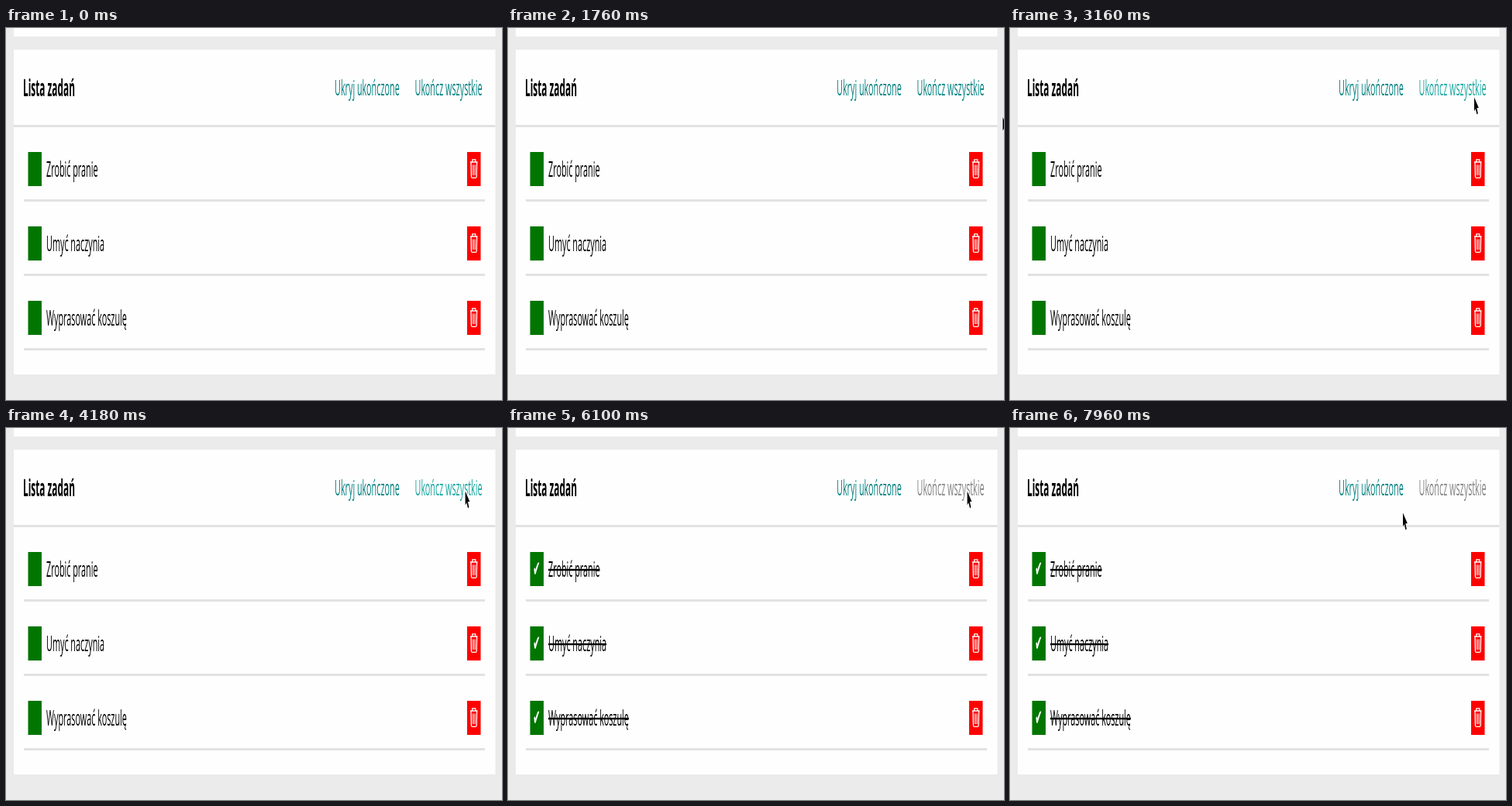
An HTML page with a canvas for the animation above (8000 ms loop, 640x480 px).

```html
<!DOCTYPE html>
<html lang="pl">
<head>
<meta charset="utf-8">
<title>Lista zadań</title>
<style>
  html, body { margin: 0; width: 100%; height: 100%; overflow: hidden; background: #ebebeb; }
  canvas { display: block; width: 640px; height: 480px; }
</style>
</head>
<body>
<canvas id="stage" width="640" height="480"></canvas>
<script>
const ctx = document.getElementById('stage').getContext('2d');

const LOOP = 8000;
const SQUEEZE = 0.395; // the whole page is shown narrowed
const HOVER_AT = 2760;
const CLICK_AT = 4640;
const FADE = 300;

const PAGE = '#ebebeb';
const CARD = '#fefefe';
const RULE = '#e2e2e2';
const LINK = [0, 128, 128];
const LINK_HOVER = [22, 166, 160];
const LINK_OFF = [132, 132, 132];

const tasks = ['Zrobić pranie', 'Umyć naczynia', 'Wyprasować koszulę'];

// time, x, y of the pointer tip
const path = [
  [1560, 643, 118],
  [2320, 616.6, 99.5],
  [2700, 612, 97],
  [3160, 599, 89.5],
  [3600, 592.6, 81.5],
  [7300, 592.6, 81.5],
  [7960, 507, 109.5],
  [8000, 504, 109.5]
];

const clamp = v => Math.min(1, Math.max(0, v));
const ease = v => v * v * (3 - 2 * v);
const mix = (a, b, p) => a + (b - a) * p;
const mixColor = (a, b, p) => a.map((v, i) => Math.round(mix(v, b[i], p)));
const rgb = c => `rgb(${c.join(',')})`;

function rect(color, x, y, w, h) {
  ctx.fillStyle = color;
  ctx.fillRect(x, y, w, h);
}

function text(str, x, y, color, font, struck) {
  ctx.save();
  ctx.translate(x, y);
  ctx.scale(SQUEEZE, 1);
  ctx.font = font;
  ctx.fillStyle = color;
  ctx.fillText(str, 0, 0);
  if (struck) ctx.fillRect(0, -10.2, ctx.measureText(str).width, 2.4);
  ctx.restore();
}

const plain = (str, x, y, color, struck) =>
  text(str, x, y, color, '27.4px "Open Sans", sans-serif', struck);

function trash(x, y) {
  ctx.save();
  ctx.translate(x, y);
  ctx.strokeStyle = '#fff';
  ctx.lineWidth = 1.3;
  ctx.beginPath();
  ctx.moveTo(4, 13);
  ctx.lineTo(13.5, 13);
  ctx.moveTo(6.8, 12.5);
  ctx.lineTo(6.8, 9.8);
  ctx.lineTo(10.8, 9.8);
  ctx.lineTo(10.8, 12.5);
  ctx.moveTo(5, 13);
  ctx.lineTo(5.4, 31.5);
  ctx.quadraticCurveTo(5.5, 33.3, 6.4, 33.3);
  ctx.lineTo(11.2, 33.3);
  ctx.quadraticCurveTo(12.1, 33.3, 12.2, 31.5);
  ctx.lineTo(12.6, 13);
  ctx.stroke();
  ctx.lineWidth = 0.8;
  ctx.beginPath();
  for (const bar of [7.3, 8.8, 10.3]) {
    ctx.moveTo(bar, 16.5);
    ctx.lineTo(bar, 30);
  }
  ctx.stroke();
  ctx.restore();
}

function row(label, i, done) {
  const y = 160 + i * 95.8;
  const top = Math.round(y);
  rect('#007500', 28.5, top, 17.5, 44);
  rect('#ff0000', 595, top, 17.5, 44);
  if (done) text('✔', 32.2, top + 31, '#fff', '28px "DejaVu Sans", sans-serif');
  plain(label, 52, top + 32, '#000', done);
  trash(595, top);
  rect(RULE, 23, Math.round(y + 61), 595, 3);
}

function linkColor(t) {
  if (t >= CLICK_AT) return mixColor(LINK_HOVER, LINK_OFF, clamp((t - CLICK_AT) / FADE));
  return mixColor(LINK, LINK_HOVER, clamp((t - HOVER_AT) / FADE));
}

function pointerAt(t) {
  const i = path.findIndex(p => t < p[0]);
  if (i < 1) return null;
  const [t0, x0, y0] = path[i - 1];
  const [t1, x1, y1] = path[i];
  const p = ease((t - t0) / (t1 - t0));
  return [mix(x0, x1, p), mix(y0, y1, p)];
}

function pointer([x, y]) {
  ctx.save();
  ctx.translate(x, y);
  ctx.beginPath();
  ctx.moveTo(0, 0);
  ctx.lineTo(0, 18);
  ctx.lineTo(1.7, 14.8);
  ctx.lineTo(3.4, 22);
  ctx.lineTo(4.8, 20.8);
  ctx.lineTo(3.3, 13.8);
  ctx.lineTo(5.8, 13.5);
  ctx.closePath();
  ctx.lineJoin = 'round';
  ctx.strokeStyle = '#fff';
  ctx.lineWidth = 1.4;
  ctx.stroke();
  ctx.fillStyle = '#000';
  ctx.fill();
  ctx.restore();
}

function draw(t) {
  const done = t >= CLICK_AT;
  rect(PAGE, 0, 0, 640, 480);
  rect(CARD, 10, 0, 621.5, 11);
  rect(CARD, 10, 28, 621.5, 419);
  text('Lista zadań', 22, 87.5, '#000', 'bold 30px "Open Sans", sans-serif');
  plain('Ukryj ukończone', 424, 86.5, rgb(LINK));
  plain('Ukończ wszystkie', 527.5, 86.5, rgb(linkColor(t)));
  rect(RULE, 10, 125, 621.5, 3);
  tasks.forEach((label, i) => row(label, i, done));
  const tip = pointerAt(t);
  if (tip) pointer(tip);
}

function tick() {
  draw(performance.now() % LOOP);
  requestAnimationFrame(tick);
}
tick();
</script>
</body>
</html>
```
